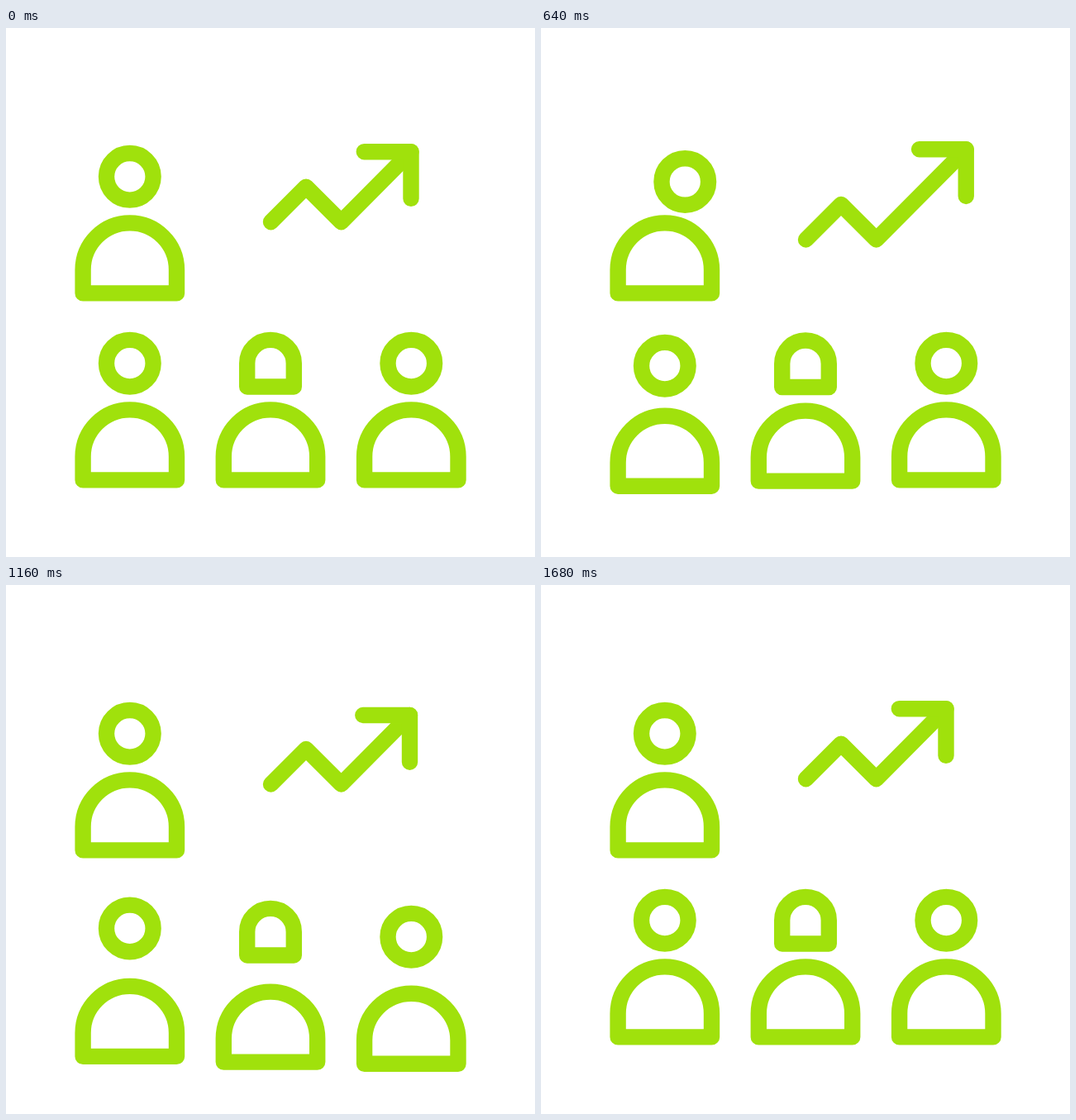
An HTML page with a canvas for the animation above (1760 ms loop, 640x640 px).

```html
<!DOCTYPE html>
<html lang="en">
<head>
<meta charset="utf-8">
<title>Team growth</title>
<style>
html, body { margin: 0; width: 100%; height: 100%; overflow: hidden; background: #fff; }
canvas { display: block; }
</style>
</head>
<body>
<canvas id="stage" width="640" height="640"></canvas>
<script>
const ctx = document.getElementById('stage').getContext('2d');
const LOOP = 1760, STEP = 40, LAST = 1680;
const HEAD = 28.3, BODY = 56.7;

// Eases from 0 to 1 within `length` ms after `start`.
function ease(t, start, length) {
  const u = Math.min(1, Math.max(0, (t - start) / length));
  return u * u * u * (10 - 15 * u + 6 * u * u);
}

// Goes up and comes back down.
const swing = (t, rise, fall) => ease(t, rise, 480) - ease(t, fall, 480);

// Smooth curve through [time, value] keys that never overshoots a key.
function track(keys) {
  const slope = keys.slice(1).map(([t, v], i) => (v - keys[i][1]) / (t - keys[i][0]));
  const tangent = keys.map((_, i) => {
    const a = slope[i - 1] || 0, b = slope[i] || 0;
    return a * b > 0 ? 2 * a * b / (a + b) : 0;
  });
  return t => {
    const next = keys.findIndex(k => k[0] > t);
    if (next < 0) return keys[keys.length - 1][1];
    const i = next - 1, [t0, v0] = keys[i], [t1, v1] = keys[next];
    const d = t1 - t0, u = (t - t0) / d, w = 1 - u;
    return v0 * w * w * (1 + 2 * u) + v1 * u * u * (3 - 2 * u)
      + d * u * w * (tangent[i] * w - tangent[next] * u);
  };
}

const arrowDrop = track([[0, 0], [40, 0.3], [220, 5.5], [380, 14.5], [480, 18.5], [650, 21.3],
  [800, 20.5], [1000, 15], [1160, 6.3], [1360, 0.9], [1640, 0]]);
const arrowReach = track([[0, 0], [160, -1.2], [330, -6], [480, 3], [650, 24.4],
  [800, 9.3], [1000, -5.8], [1160, -1.5], [1360, 0]]);

const team = [
  { x: 149.8, rise: 475, fall: 980, nod: 13.4 },
  { x: 320, rise: 558, fall: 1058, nod: 15, square: true },
  { x: 490.3, rise: 645, fall: 1142, nod: 20 }
];

function circle(x, y) {
  ctx.beginPath();
  ctx.arc(x, y, HEAD, 0, Math.PI * 2);
  ctx.stroke();
}

function arch(x, y, radius) {
  ctx.beginPath();
  ctx.arc(x, y, radius, Math.PI, 0);
  ctx.lineTo(x + radius, y + HEAD);
  ctx.lineTo(x - radius, y + HEAD);
  ctx.closePath();
  ctx.stroke();
}

function line(...points) {
  ctx.beginPath();
  points.forEach(([x, y]) => ctx.lineTo(x, y));
  ctx.stroke();
}

function drawArrow(t) {
  const drop = arrowDrop(t), reach = arrowReach(t);
  const x = 490 + reach, y = 149.7 + drop - reach;
  line([320.5, 234.7 + drop], [363, 192.2 + drop], [405.6, 234.7 + drop], [x, y]);
  line([x - 56.7, y], [x, y], [x, y + 56.7]);
}

function draw(t) {
  ctx.fillStyle = '#fff';
  ctx.fillRect(0, 0, 640, 640);
  ctx.strokeStyle = '#a0e10c';
  ctx.lineWidth = 19.4;
  ctx.lineCap = ctx.lineJoin = 'round';

  const lean = swing(t, 187, 696);
  circle(149.8 + 24.5 * lean, 179.8 + 6.2 * lean);
  arch(149.8, 292.6, BODY);

  for (const { x, rise, fall, nod, square } of team) {
    const dip = swing(t, rise, fall), headY = 405.7 + nod * dip;
    if (square) arch(x, headY, HEAD);
    else circle(x, headY);
    arch(x, 518.6 + 32.4 * dip, BODY);
  }
  drawArrow(t);
}

const begin = performance.now();
function frame() {
  const t = (performance.now() - begin) % LOOP;
  draw(Math.min(LAST, Math.floor(t / STEP) * STEP));
  requestAnimationFrame(frame);
}
frame();
</script>
</body>
</html>
```
